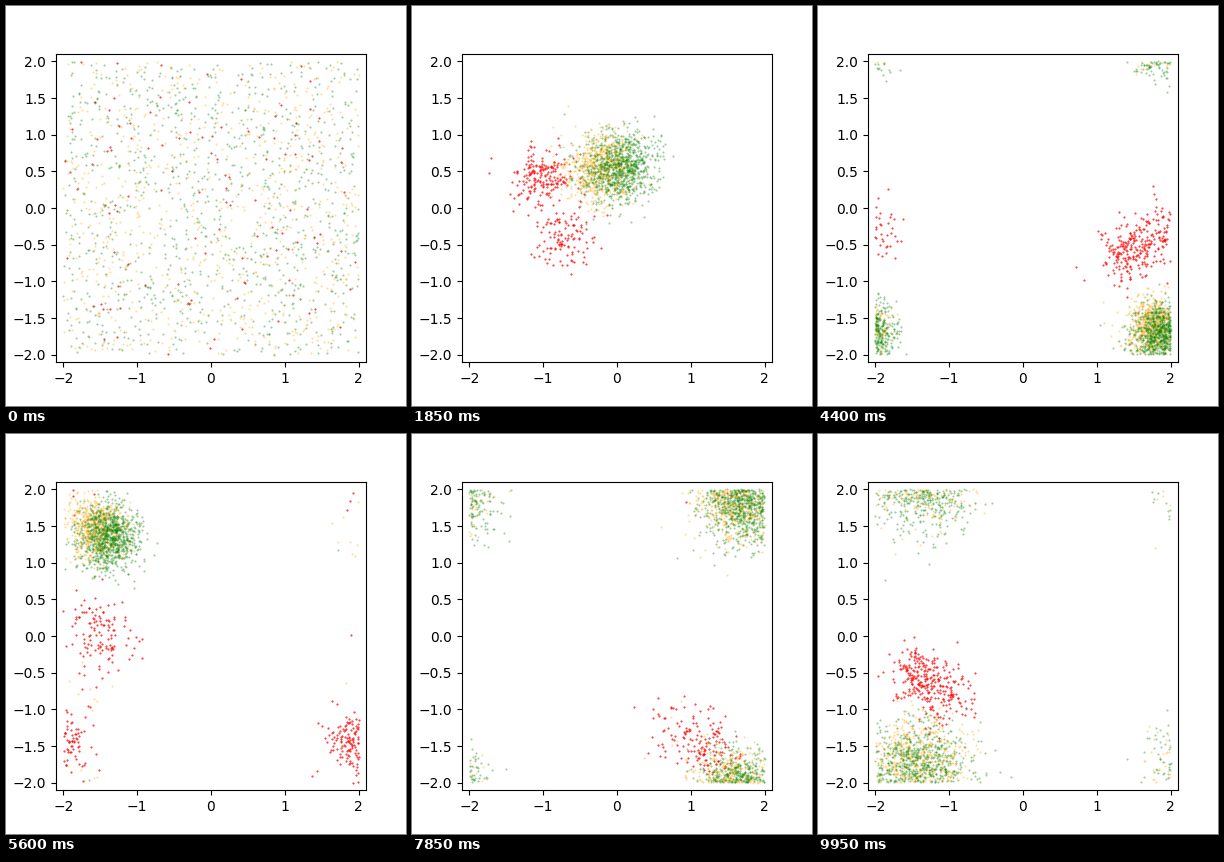
A matplotlib script that plays this animation: 400 px wide and 400 px high, repeating every 10000 ms.

```python
import numpy as np
import matplotlib.pyplot as plt
from matplotlib.animation import FuncAnimation

FRAMES, INTERVAL = 200, 50
N, CLUMPS = 1900, 90
COLOURS = ("red", "orange", "green")
ALPHAS = (0.85, 0.4, 0.4)
ORANGE_SHARE = 0.42     # of the dots that are not red
RED_SPREAD = 0.21

# Unwrapped way of the swarm: ms, share of red, spread of the main flock,
# then the centres of the main flock and of the two red groups behind it.
PATH = (
    (1850, 0.16, 0.25, (0.02, 0.55), (-1.0, 0.42), (-0.72, -0.42)),
    (3250, 0.18, 0.25, (1.12, -0.62), (-0.08, -0.25), (0.12, -1.4)),
    (4400, 0.16, 0.20, (1.87, -1.72), (1.45, -0.6), (1.9, -0.35)),
    (6850, 0.18, 0.26, (4.0, -4.12), (3.1, -3.3), (3.42, -1.8)),
    (7700, 0.09, 0.28, (5.7, -5.85), (5.2, -5.2), (4.8, -4.8)),
    (8850, 0.03, 0.32, (4.05, -8.1), (3.8, -7.05), (4.6, -7.4)),
    (9950, 0.16, 0.35, (2.6, -9.85), (2.6, -8.5), (2.95, -8.8)),
)

rng = np.random.default_rng(7)
rank = rng.permutation(N) / N      # decides the colour
in_front = rng.random(N) < 0.6     # decides the red group
flip = rng.random(N)               # moment of a colour change between keys
clump = rng.normal(size=(CLUMPS, 2))[rng.integers(CLUMPS, size=N)]
place = 0.6 * clump + 0.8 * rng.normal(size=(N, 2))


def wrap(p):
    return (p + 2) % 4 - 2


def colour_of(red):
    orange = red + ORANGE_SHARE * (1 - red)
    return np.where(rank < red, 0, np.where(rank < orange, 1, 2))


def pose(time, red, spread, flock, front, back):
    """Colour and unwrapped position of every dot; the swarm slowly turns."""
    kind = colour_of(red)
    flock, front = np.array(flock), np.array(front)
    lagging = flock + (front - flock) * (0.25, 0.08)
    centre = np.where((kind == 1)[:, None], lagging, flock)
    group = np.where(in_front[:, None], front, back)
    is_red = (kind == 0)[:, None]
    turn = 0.00025 * time
    c, s = np.cos(turn), np.sin(turn)
    offset = place @ np.array([[c, s], [-s, c]])
    return kind, (np.where(is_red, group, centre)
                  + offset * np.where(is_red, RED_SPREAD, spread))


keys = [pose(*row) for row in PATH]

# Scattered start: every dot takes the shortest way to its first group.
first = keys[0][1]
scatter = first + wrap(rng.uniform(-2, 2, (N, 2)) - first)
keys.insert(0, (colour_of(0.06), scatter))

times = np.array([0] + [row[0] for row in PATH]) / INTERVAL
kinds = np.array([k for k, _ in keys])
poses = np.array([p for _, p in keys])
slopes = np.gradient(poses, times, axis=0)


def swarm(frame):
    """Smooth cubic motion between the two nearest keys."""
    i = min(np.searchsorted(times, frame, side="right") - 1, len(times) - 2)
    span = times[i + 1] - times[i]
    u = (frame - times[i]) / span
    pos = ((1 + 2 * u) * (1 - u) ** 2 * poses[i]
           + u * (1 - u) ** 2 * span * slopes[i]
           + u * u * (3 - 2 * u) * poses[i + 1]
           + u * u * (u - 1) * span * slopes[i + 1])
    return wrap(pos), np.where(u > flip, kinds[i + 1], kinds[i])


fig, ax = plt.subplots(figsize=(4, 4), dpi=100)
ax.set_xlim(-2.098, 2.1)
ax.set_ylim(-2.1, 2.1)
ax.set_xticks(np.arange(-2, 3))
ax.set_yticks(np.arange(-2, 2.1, 0.5))
dots = [ax.plot([], [], "o", color=c, alpha=a, markersize=0.5)[0]
        for c, a in zip(COLOURS, ALPHAS)]


def draw(frame):
    pos, kind = swarm(frame)
    for c, line in enumerate(dots):
        line.set_data(*pos[kind == c].T)
    return dots


anim = FuncAnimation(fig, draw, frames=FRAMES, interval=INTERVAL,
                     repeat=True, repeat_delay=0, blit=True)
plt.show()
```
